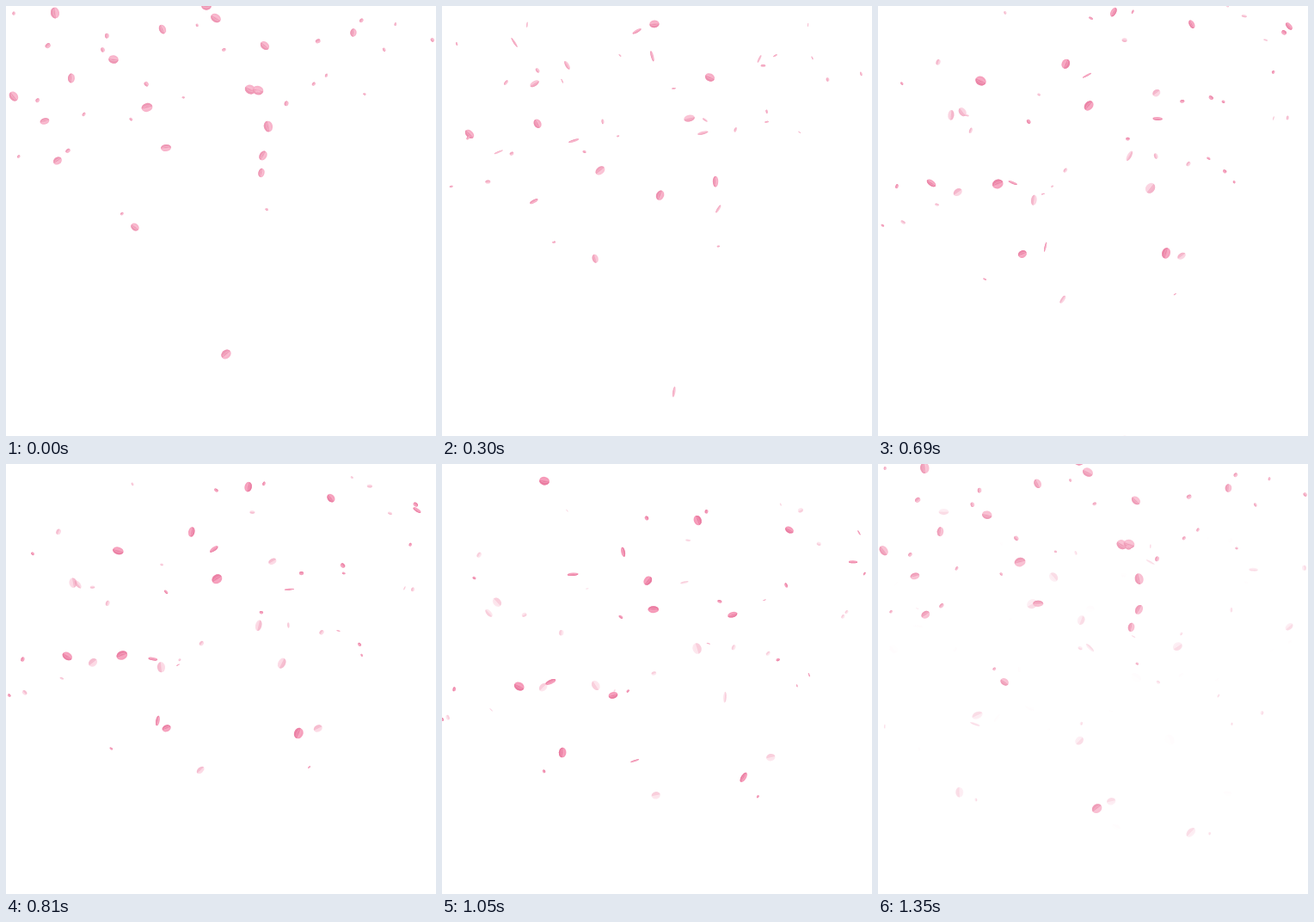
These frames come from a looping animation (500 by 500 pixels, 1380 ms). An HTML page with a canvas:

```html
<!DOCTYPE html>
<html>
<head>
<meta charset="utf-8">
<title>Falling petals</title>
<style>
html, body { margin: 0; width: 100%; height: 100%; overflow: hidden; background: #fff }
canvas { display: block }
</style>
</head>
<body>
<canvas id="stage" width="500" height="500"></canvas>
<script>
const LOOP = 1380, STEP = 30, BLEND = 1170;
const ctx = document.getElementById('stage').getContext('2d');

let seed = 11;
const random = () => {
  const v = Math.sin(seed++ * 12.9898) * 43758.5453;
  return v - Math.floor(v);
};
const between = (a, b) => a + (b - a) * random();

// Start x, y and end x, y of the larger petals.
const vivid = [
  [244, 14, 246, 187], [305, 140, 356, 390], [299, 174, 122, 354],
  [233, 0, 208, 114], [9, 105, 99, 276], [164, 118, 122, 269],
  [57, 8, 163, 142], [76, 84, 213, 290], [60, 180, 243, 364],
  [301, 46, 342, 190], [478, -150, 478, 144], [268, -106, 102, 34],
  [229, -105, 305, 85], [290, -85, 417, 95], [250, -25, 238, 154]
];
const fading = [
  [182, 27, 40, 190], [404, 31, 268, 150], [284, 97, 298, 228],
  [293, 98, 333, 291], [297, 194, 392, 358], [125, 62, 57, 172],
  [45, 134, 126, 274], [186, 165, 178, 268], [150, 257, 260, 400],
  [256, 405, 310, 575]
];

const petals = [];
function addPetal([x, y, endX, endY], r, fades) {
  petals.push({
    x, y, r, fades, vx: (endX - x) / BLEND, vy: (endY - y) / BLEND,
    angle: between(0, Math.PI), turn: between(-.0025, .0025),
    flip: between(-.7, .7), flipSpeed: between(.002, .005)
  });
}
for (const path of vivid) addPetal(path, between(5, 6.5), false);
for (const path of fading) addPetal(path, between(4.5, 6.5), true);

// Small distant petals, denser towards the top.
for (let i = 0; i < 36; i++) {
  const x = between(0, 500), y = between(-140, 40 + 240 * random());
  const path = [x, y, x + between(-120, 120), y + between(110, 180)];
  addPetal(path, between(1.6, 3.4), i % 2 === 0);
}

function drawPetal(p, t, opacity) {
  const age = Math.max(0, t) / LOOP;
  const long = p.r, wide = p.r * (.16 + .66 * Math.abs(Math.cos(p.flip + p.flipSpeed * t)));
  const light = 83 - (p.fades ? 0 : 8 * age);
  ctx.save();
  ctx.globalAlpha = opacity * (p.fades ? .95 - .85 * age : .95);
  ctx.translate(p.x + p.vx * t, p.y + p.vy * t);
  ctx.rotate(p.angle + p.turn * t);

  ctx.fillStyle = `hsl(340 83% ${light}%)`;
  ctx.beginPath();
  ctx.ellipse(0, 0, long, wide, 0, 0, 7);
  ctx.fill();

  ctx.fillStyle = `hsl(340 72% ${light - 7}%)`;
  ctx.beginPath();
  ctx.ellipse(0, 0, long, wide, 0, 0, Math.PI);
  ctx.fill();

  ctx.strokeStyle = `hsl(340 80% ${light + 6}%)`;
  ctx.lineWidth = .5;
  ctx.beginPath();
  for (const v of [-.45, .4]) {
    ctx.moveTo(-long * .7, wide * v * .5);
    ctx.quadraticCurveTo(0, wide * v * 1.4, long * .7, wide * v * .5);
  }
  ctx.stroke();
  ctx.restore();
}

function render(now) {
  const t = Math.floor(now % LOOP / STEP) * STEP;
  const mix = Math.max(0, (t - BLEND) / (LOOP - BLEND));
  ctx.clearRect(0, 0, 500, 500);
  for (const p of petals) {
    drawPetal(p, t, 1 - mix);
    if (mix) drawPetal(p, t - LOOP, mix);
  }
}

const start = performance.now();
function tick() {
  render(performance.now() - start);
  requestAnimationFrame(tick);
}
tick();
</script>
</body>
</html>
```
